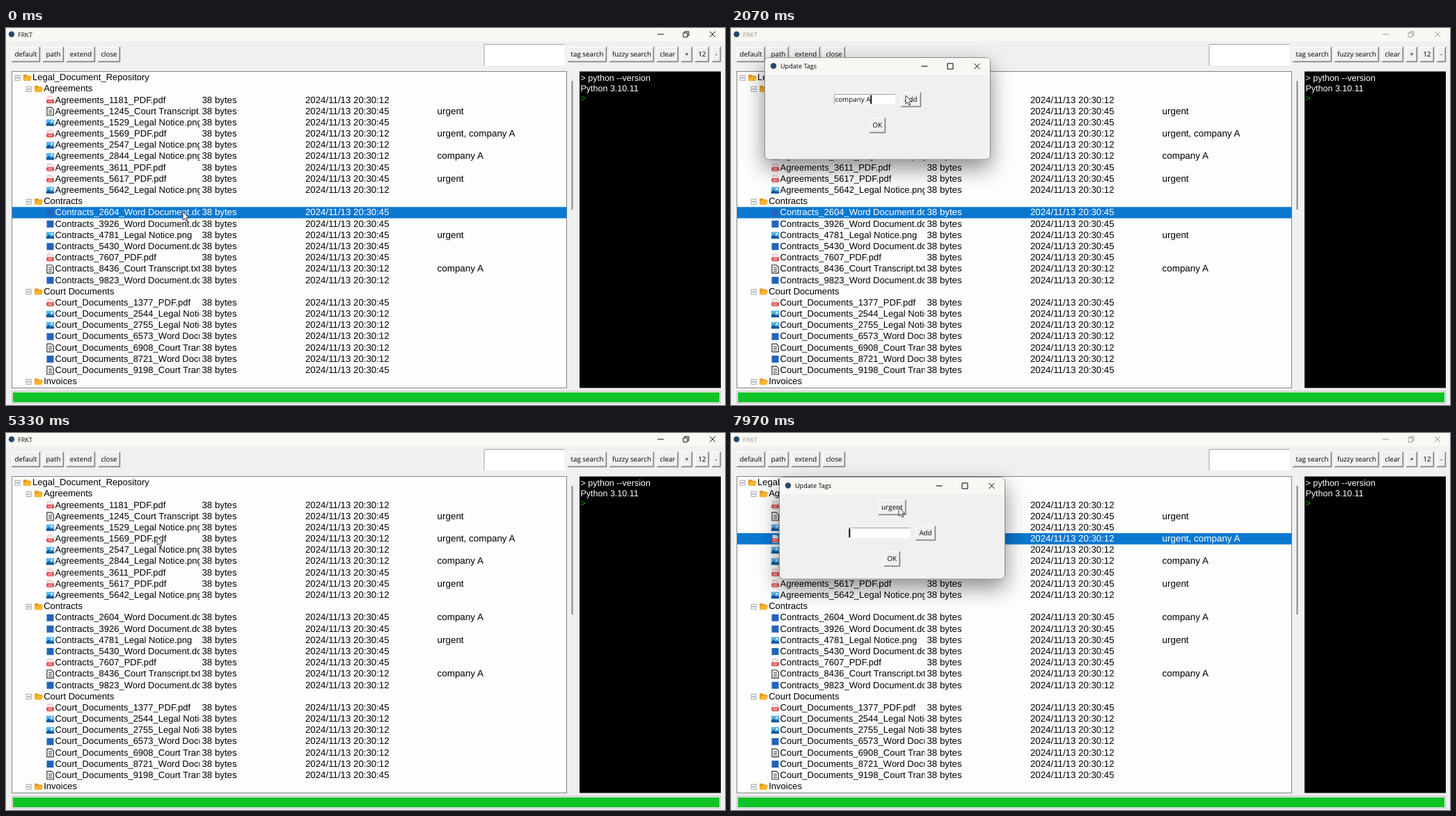
Recreate the animation shown at these times as an HTML page. Size 1033 by 542 pixels, loop 8000 ms.

```html
<!DOCTYPE html>
<html lang="en">
<head>
<meta charset="utf-8">
<title>Document tags</title>
<style>
html, body { margin: 0; width: 100%; height: 100%; overflow: hidden; background: #f0f0f0; }
svg { display: block; width: 100%; height: 100%; }
text { white-space: pre; text-rendering: geometricPrecision; }
.row { font: 13.25px "Liberation Sans", Arial, sans-serif; }
.name { font-size: 13.02px; }
.tags { font-size: 13.45px; }
.term { font: 12.5px "Liberation Sans", Arial, sans-serif; fill: #fff; }
.ui { font: 9.8px "Open Sans", "Noto Sans", sans-serif; }
.cap { font: 9.1px "Open Sans", "Noto Sans", sans-serif; }
</style>
</head>
<body>
<svg viewBox="0 0 1033 542" preserveAspectRatio="none">
  <defs>
    <clipPath id="nameCol"><rect x="9" y="63" width="269.500" height="454"/></clipPath>
    <filter id="shadow" x="-25%" y="-40%" width="150%" height="200%">
      <feDropShadow dx="0" dy="12" stdDeviation="15" flood-color="#000" flood-opacity=".45"/>
    </filter>
    <g id="folder">
      <path d="M-6-4.500h4.500l1.300 1.500H4.500V-1H-3L-6 4.500z" fill="#e39a1c"/>
      <path d="M-3.200-1.500H6.200L4 4.700H-6z" fill="#fbb62f"/>
    </g>
    <g id="pdf">
      <path d="M-3.700-5.500H2L4.200-3.300V5.500H-3.700z" fill="#f4e9e9" stroke="#d8a5a5" stroke-width=".7"/>
      <rect x="-5.300" y="-.7" width="10.800" height="5" rx=".8" fill="#e04848"/>
      <path d="M-3 1.800H3" stroke="#f7c9c9" stroke-width="1.500"/>
    </g>
    <g id="txt">
      <path d="M-4.600-5.800H1.800L4.800-2.800V5.800H-4.600z" fill="#fff" stroke="#333" stroke-width="1.200"/>
      <path d="M-2.500-1.800H2.700M-2.500.7H2.700M-2.500 3.200H2.700" stroke="#333"/>
    </g>
    <g id="png">
      <rect x="-5.700" y="-4.700" width="11.400" height="9.400" rx="1" fill="#58b5ec"/>
      <path d="M-5.700 4.700V2.200L-2-1 1 2 3 .6 5.700 2.800V4.700z" fill="#14589a"/>
      <circle cx="2.400" cy="-2" r="1.200" fill="#fff"/>
    </g>
    <rect id="docx" x="-5" y="-5" width="10" height="10" fill="#2264bd"/>
  </defs>
  <g id="base"></g>
  <g id="rows"></g>
  <g id="dialog"></g>
  <path id="mouse" d="M0 0V12.200L2.900 9.600 4.800 14 6.800 13.100 4.900 8.800H8.900z" fill="#fff" stroke="#222" stroke-width=".9"/>
</svg>
<script>
const LOOP = 8000, PITCH = 16.185, TOP = 70.7;
const $ = id => document.getElementById(id);

// shape helpers
const rect = (x, y, w, h, fill, more = '') =>
  `<rect x="${x}" y="${y}" width="${w}" height="${h}" fill="${fill}" ${more}/>`;
const line = (d, color, w = 1) =>
  `<path d="${d}" fill="none" stroke="${color}" stroke-width="${w}"/>`;
const text = (x, y, s, cls, more = '') =>
  `<text x="${x}" y="${y}" class="${cls}" ${more}>${s.replace(/</g, '&lt;').replace(/>/g, '&gt;')}</text>`;
const icon = (name, x, y) => `<use href="#${name}" x="${x}" y="${y}"/>`;

function button(x, y, w, h, label) {
  const r = x + w, b = y + h;
  return rect(x, y, w, h, '#f0f0f0') +
    line(`M${x + .5} ${b}V${y + .5}H${r}`, '#fff') +
    line(`M${x + 1} ${b - 1.2}H${r - 1.2}V${y + 1}`, '#a9a9a9') +
    line(`M${x} ${b - .3}H${r - .3}V${y}`, '#6c6c6c') +
    text(x + w / 2, y + h / 2 + 3.4, label, 'ui', 'text-anchor="middle"');
}

function entry(x, y, w, h) {
  return rect(x, y, w, h, '#fff') +
    line(`M${x + .5} ${y + h}V${y + .5}H${x + w}`, '#a0a0a0') +
    line(`M${x} ${y + h - .5}H${x + w - .5}V${y}`, '#f0f0f0');
}

function controls(xMin, xMax, xClose, y, restored) {
  return line(`M${xMin} ${y}h9`, 'currentColor') +
    (restored
      ? line(`M${xMax} ${y - 2}h6v6h-6zM${xMax + 2} ${y - 2}v-2h6v6h-2`, 'currentColor')
      : line(`M${xMax} ${y - 4}h8v8h-8z`, 'currentColor')) +
    line(`M${xClose} ${y - 4}l8 8m0-8l-8 8`, 'currentColor');
}

// main window
$('base').innerHTML =
  rect(0, 0, 1033, 542, '#f0f0f0') + rect(0, 0, 1033, 19, '#faf8f2') +
  '<circle cx="8" cy="9" r="4.2" fill="#27476b"/>' +
  `<g id="title">${text(17, 12.5, 'FRKT', 'cap', 'fill="currentColor"')}${controls(936, 973, 1011, 9, true)}</g>` +
  [[8, 41, 'default'], [53, 30, 'path'], [87, 41, 'extend'], [132, 32, 'close'],
   [807, 56, 'tag search'], [867, 64, 'fuzzy search'], [935, 31, 'clear'],
   [970, 16, '+'], [990, 20, '12'], [1014, 13, '-']]
    .map(([x, w, s]) => button(x, 27, w, 22, s)).join('') +
  entry(686.5, 23, 117, 32) +
  rect(8.5, 62.5, 797, 455, '#fdfdfd', 'stroke="#858585"') +
  rect(812.5, 76, 2, 185, '#858585') +
  rect(824, 62.5, 203, 455, '#000') +
  text(825.5, 76, '> python --version', 'term') +
  text(825.5, 90.5, 'Python 3.10.11', 'term') +
  text(825.5, 105, '>', 'term', 'style="fill:#0a0"') +
  rect(8.5, 522, 1018, 17.5, '#e6e6e6', 'stroke="#c4c4c4"') +
  rect(10, 524, 1015, 14, '#10c327');

// file tree: number, kind, seconds, tags
const KINDS = {
  P: ['PDF.pdf', 'pdf'], T: ['Court Transcript.txt', 'txt'],
  N: ['Legal Notice.png', 'png'], W: ['Word Document.docx', 'docx']
};
const TREE = [
  ['Agreements', '1181 P 12|1245 T 45 urgent|1529 N 45|1569 P 12 urgent, company A|2547 N 12|' +
    '2844 N 12 company A|3611 P 45|5617 P 45 urgent|5642 N 12'],
  ['Contracts', '2604 W 45|3926 W 45|4781 N 45 urgent|5430 W 45|7607 P 45|8436 T 12 company A|9823 W 12'],
  ['Court Documents', '1377 P 45|2544 N 12|2755 N 12|6573 W 12|6908 T 12|8721 W 12|9198 T 45'],
  ['Invoices', '']
];
const rows = [];
const addRow = html => rows.push(html(TOP + PITCH * rows.length));

const branch = (x, label) => addRow(y =>
  rect(x - 3.5, y - 2.5, 7, 7, '#fff', 'stroke="#a0a0a0"') + line(`M${x - 2} ${y + 1}h4`, '#4b5a8c') +
  icon('folder', x + 14.5, y + .7) + text(x + 21.5, y + 4.5, label, 'row name'));

branch(16.5, 'Legal_Document_Repository');
for (const [name, files] of TREE) {
  branch(32.7, name);
  for (const file of files ? files.split('|') : []) {
    const [num, kind, sec, ...tags] = file.split(' ');
    const [ending, type] = KINDS[kind];
    addRow(y =>
      icon(type, 63.5, y + .7) +
      `<g clip-path="url(#nameCol)">${text(70.5, y + 4.5, `${name.replace(' ', '_')}_${num}_${ending}`, 'row name')}</g>` +
      text(281.5, y + 4.5, '38 bytes', 'row') +
      text(430, y + 4.5, '2024/11/13 20:30:' + sec, 'row') +
      text(619.5, y + 4.5, tags.join(' '), 'row tags'));
  }
}
$('rows').innerHTML = rect(9, 0, 796.5, 16.2, '#0b78d0', 'id="pick"') +
  rows.map(r => `<g>${r}</g>`).join('');
const rowEls = [...$('rows').children].slice(1);
const CONTRACT = 12, AGREEMENT = 5;
const newTag = rowEls[CONTRACT].querySelector('.tags');

// tag dialog, laid out at its first position
$('dialog').innerHTML =
  rect(48.5, 42.5, 324, 146.5, '#f0f0f0', 'rx="6" stroke="#8a8a8a" filter="url(#shadow)"') +
  '<path d="M49 67V48.5Q49 43 54.5 43H366.5Q372 43 372 48.5V67z" fill="#f8f7f4"/>' +
  '<circle cx="61" cy="54.5" r="4.2" fill="#27476b"/>' +
  text(71, 58, 'Update Tags', 'cap') + controls(273.5, 311, 349.5, 55, false) +
  `<g id="tagUrgent">${button(0, 75, 40, 22, 'urgent')}</g>` +
  `<g id="tagCompany">${button(0, 75, 61, 22, 'company A')}</g>` +
  `<g id="form">${entry(148, 95, 89, 15.5)}${text(149.5, 106, '', 'ui', 'id="typed"')}` +
  rect(0, 96.5, 1.8, 12.5, '#000', 'id="caret"') +
  button(244, 92.5, 29, 21, 'Add') + button(198.5, 129, 23.5, 22, 'OK') + '</g>';

// event times
const OPEN1 = 350, TYPE = 900, KEY = 85, ADD = 2700, CLOSE = 4200;
const PICK = 5450, OPEN2 = 6950, REMOVE = 7750;
const WORD = 'company A';

const PATH = [[0, 254, 264], [350, 254, 264], [700, 253, 233], [1450, 253, 233], [1980, 251, 97],
  [2750, 251, 97], [3300, 214, 160], [4750, 214, 160], [5300, 217, 149], [7000, 217, 149],
  [7550, 241, 107], [LOOP, 241, 107]];

function mouseAt(t) {
  const i = PATH.findIndex(p => p[0] > t);
  const [t0, x0, y0] = PATH[i - 1], [t1, x1, y1] = PATH[i];
  const u = (t - t0) / (t1 - t0), k = u * u * (3 - 2 * u);
  return [x0 + (x1 - x0) * k, y0 + (y1 - y0) * k];
}

const show = (el, on) => el.setAttribute('visibility', on ? 'inherit' : 'hidden');

function place(el, x) {
  show(el, x !== null);
  if (x !== null) el.setAttribute('transform', `translate(${x})`);
}

function draw(t) {
  const second = t >= OPEN2;
  const open = (t >= OPEN1 && t < CLOSE) || second;
  const picked = t < CLOSE ? CONTRACT : t >= PICK ? AGREEMENT : -1;

  $('title').style.color = open ? '#999' : '#111';
  show($('pick'), picked >= 0);
  $('pick').setAttribute('y', TOP + PITCH * picked - 7.6);
  rowEls.forEach((el, i) => el.setAttribute('fill', i === picked ? '#fff' : '#000'));
  newTag.textContent = t >= CLOSE ? WORD : '';

  show($('dialog'), open);
  if (open) {
    const age = t - (second ? OPEN2 : OPEN1), off = second ? 21 : 0;
    $('dialog').setAttribute('transform', `translate(${off} ${off})`);
    $('dialog').setAttribute('opacity', Math.min(1, age / 100));

    const both = second && t < REMOVE;
    place($('tagUrgent'), both ? 155 : second ? 190.5 : null);
    place($('tagCompany'), both ? 205 : !second && t >= ADD ? 179.5 : null);
    $('form').setAttribute('transform', `translate(0 ${second || t >= ADD ? 20 : 0})`);

    const typed = t < ADD ? Math.max(0, Math.min(WORD.length, Math.floor((t - TYPE) / KEY))) : 0;
    $('typed').textContent = WORD.slice(0, typed);
    const w = typed ? $('typed').getComputedTextLength() : 0;
    $('caret').setAttribute('x', 148.5 + w + (typed ? 1 : 0));
    const reset = Math.max(...[OPEN1, TYPE + typed * KEY, ADD, OPEN2, REMOVE]
      .filter((e, i) => e <= t && (i !== 1 || typed)));
    show($('caret'), (t - reset) % 900 < 600);
  }

  $('mouse').setAttribute('transform', `translate(${mouseAt(t).join(' ')})`);
}

const start = performance.now();
function tick() {
  draw((performance.now() - start) % LOOP);
  requestAnimationFrame(tick);
}
tick();
</script>
</body>
</html>
```
